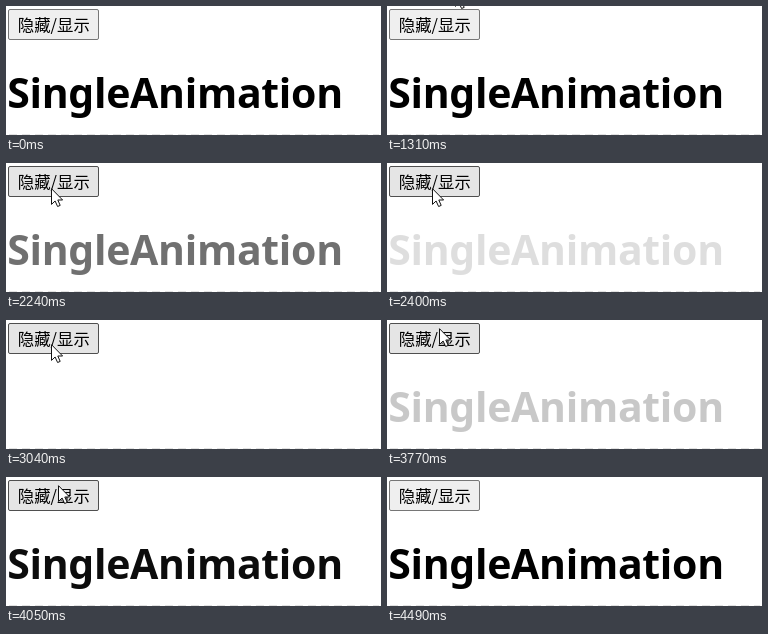
Animation of 375 by 129 pixels, one loop 6680 ms. Source, as an HTML page:

```html
<!DOCTYPE html>
<html lang="zh-CN">
<head>
<meta charset="utf-8">
<title>SingleAnimation</title>
<style>
  html, body { margin: 0; width: 100%; height: 100%; overflow: hidden; background: #fff; }
  svg { display: block; width: 100%; height: 100%; }
  .label { font: 300 16.4px "Noto Sans CJK SC", "Noto Sans CJK", sans-serif; }
  .title { font: bold 41px "Noto Sans", "Open Sans", sans-serif; letter-spacing: -0.3px; }
</style>
</head>
<body>
<svg viewBox="0 0 375 129">
  <rect id="button" x="2.5" y="3.5" width="90" height="30" rx="1.5"/>
  <text class="label" x="47.8" y="25" text-anchor="middle">隐藏/显示</text>
  <text id="title" class="title" x="1.2" y="102">SingleAnimation</text>
  <path d="M3 128.5H373" stroke="#e2e2e2" stroke-dasharray="8 5"/>
  <path id="cursor" d="M.5 .7V16.4L4.1 13 6.6 18.5 9.2 17.4 6.8 12H11.6Z"
    fill="#fff" stroke="#111" stroke-linejoin="round"/>
</svg>
<script>
const LOOP = 6680, FADE = 500;
const HIDE_AT = 2108, SHOW_AT = 3690;
const presses = [[1940, 2075], [3540, 3655]];

// Cursor tip: start, end, from, control, to
const moves = [
  [1310, 1510, [68, -16], [58, 12], [45, 25]],
  [3025, 3170, [45, 25], [46, 14], [52, 8]],
  [4210, 4480, [52, 8], [95, 50], [374, 132]]
];

const [button, title, cursor] = ["button", "title", "cursor"].map(id => document.getElementById(id));
const clamp = v => Math.min(1, Math.max(0, v));
const bezier = (a, b, c, d, u) =>
  a * (1 - u) ** 3 + 3 * b * u * (1 - u) ** 2 + 3 * c * u * u * (1 - u) + d * u ** 3;

// The CSS "ease" curve
function ease(x) {
  let lo = 0, hi = 1;
  for (let i = 0; i < 24; i++) {
    const mid = (lo + hi) / 2;
    if (bezier(0, .25, .25, 1, mid) < x) lo = mid; else hi = mid;
  }
  return bezier(0, .1, 1, 1, lo);
}

const fade = (t, start) => ease(clamp((t - start) / FADE));

function tipAt(t) {
  if (t < moves[0][0] || t >= moves[2][1]) return null;
  const [start, end, a, b, c] = moves.filter(m => t >= m[0]).pop();
  const p = clamp((t - start) / (end - start));
  const u = p * p * (3 - 2 * p);
  return a.map((v, i) => Math.round(v * (1 - u) ** 2 + 2 * b[i] * u * (1 - u) + c[i] * u * u));
}

function buttonColors(t, tip) {
  if (presses.some(([from, to]) => t >= from && t < to)) return ["#f5f5f5", "#8d8d8d"];
  const over = tip && tip[0] >= 2 && tip[0] < 93 && tip[1] >= 3 && tip[1] < 34;
  return over ? ["#e5e5e5", "#4f4f4f"] : ["#efefef", "#767676"];
}

function draw(t) {
  const tip = tipAt(t);
  const [fill, stroke] = buttonColors(t, tip);
  button.setAttribute("fill", fill);
  button.setAttribute("stroke", stroke);
  title.setAttribute("opacity", t < SHOW_AT ? 1 - fade(t, HIDE_AT) : fade(t, SHOW_AT));
  cursor.setAttribute("visibility", tip ? "visible" : "hidden");
  if (tip) cursor.setAttribute("transform", `translate(${tip})`);
}

const startTime = performance.now();
function tick() {
  draw((performance.now() - startTime) % LOOP);
  requestAnimationFrame(tick);
}
tick();
</script>
</body>
</html>
```
